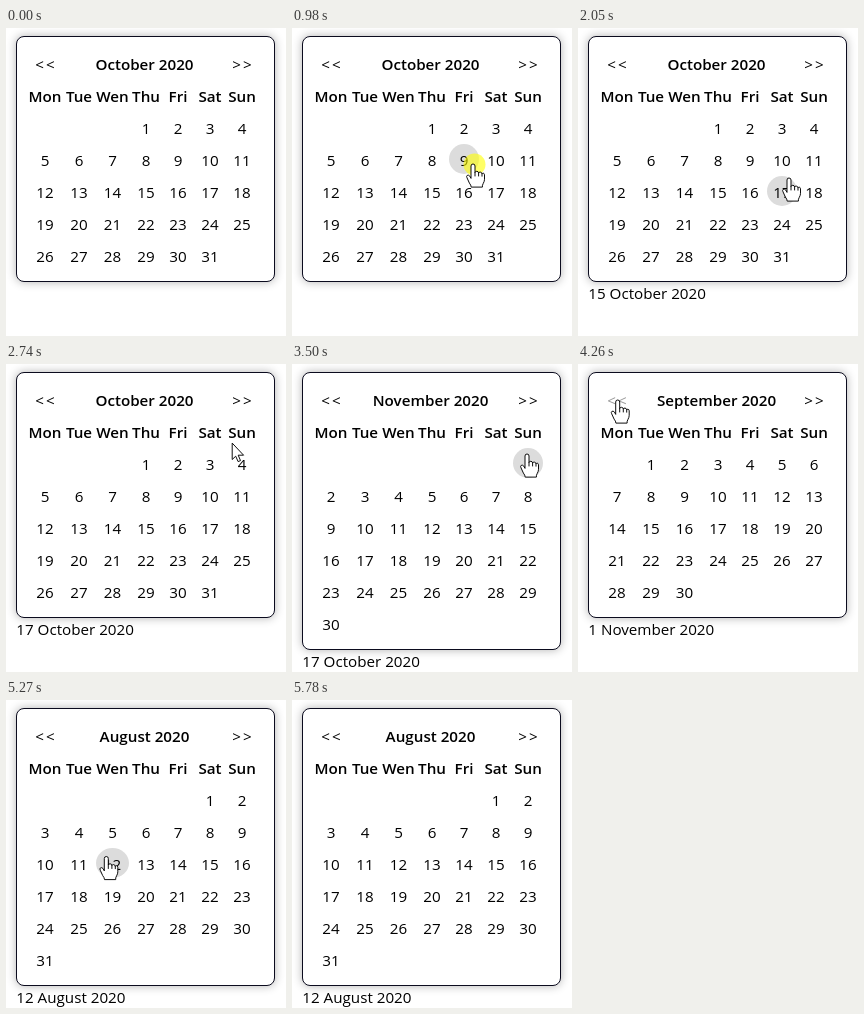
Write an HTML page that moves like this. It is 280 px wide and 308 px high and loops after 6.1 s.

```html
<!DOCTYPE html>
<html lang="en">
<head>
<meta charset="utf-8">
<title>Date picker</title>
<style>
  html, body { margin: 0; width: 100%; height: 100%; overflow: hidden; background: #fff; }
  #stage { position: relative; width: 280px; height: 308px; overflow: hidden; }
  #card {
    position: absolute; left: 10px; top: 8px; width: 259px; box-sizing: border-box;
    border: 1px solid #0b0b1e; border-radius: 8px; background: #fff;
    box-shadow: 0 0 10px rgba(0, 0, 0, .3);
  }
  svg {
    position: absolute; left: 0; top: 0;
    font: 15.2px "Open Sans", "Noto Sans", sans-serif; text-anchor: middle;
  }
  .bold { font-weight: 600; }
  .nav { letter-spacing: 2px; }
  .nav.over { fill: #999; }
  #picked { text-anchor: start; }
  .pointer { fill: #fff; stroke: #000; stroke-width: .95; stroke-linejoin: round; stroke-linecap: round; }
</style>
</head>
<body>
<div id="stage">
  <div id="card"></div>
  <svg width="280" height="308" viewBox="0 0 280 308">
    <ellipse id="hover" ry="15" fill="#dcdcdc"/>
    <text id="title" class="bold" x="138.5" y="42"></text>
    <text id="prev" class="nav" x="40" y="42">&lt;&lt;</text>
    <text id="next" class="nav" x="237" y="42">&gt;&gt;</text>
    <g id="week" class="bold"></g>
    <g id="days"></g>
    <text id="picked" x="10.3"></text>
    <g id="mouse">
      <circle id="press" cx="1.5" cy=".5" r="11" fill="#ff0" fill-opacity=".6"/>
      <path id="arrow" class="pointer" d="M.5 .5V16.5L4 13.2 6.4 18.6 8.8 17.6 6.5 12.2H11.5Z"/>
      <g id="hand" class="pointer">
        <path d="M-2 14V2a2 2 0 0 1 4 0V8.5q.3-1.2 1.8-1.2t1.8 1.6q.3-.9 1.7-.8t1.7 1.7q.3-.7 1.3-.6t1.2 1.6v4.5q0 2-1.2 4t-.9 3.8H-1.8q-.1-2-1.8-4L-6 13.8q-.9-1.6 .2-2.4t2.3 .4z"/>
        <path d="M2 8.5v3.5M5.6 8.9v3.1M9 9.8v2.4" fill="none"/>
      </g>
    </g>
  </svg>
</div>
<script>
const LOOP = 6100, YEAR = 2020, FIRST_MONTH = 9;
const ACT_DELAY = 80, PRESS_TIME = 110;
const MONTHS = { 7: 'August', 8: 'September', 9: 'October', 10: 'November' };
const WEEK = ['Mon', 'Tue', 'Wen', 'Thu', 'Fri', 'Sat', 'Sun'];
const GRID_LEFT = 22, GAP = 2;
const WIDTHS = [34, 30, 33, 30, 30, 30, 30];
const COLS = WIDTHS.map((w, i) =>
  WIDTHS.slice(0, i).reduce((x, prev) => x + prev + GAP, GRID_LEFT) + w / 2);
const $ = id => document.getElementById(id);
const show = (el, on) => { el.style.display = on ? '' : 'none'; };
const baseline = row => 42 + 32 * row;

const linear = u => u;
const easeOut = u => 1 - (1 - u) ** 2;
const smooth = u => u * u * (3 - 2 * u);

// time, x, y, easing into this point
const PATH = [
  [640, 277, 159], [680, 251, 146, linear], [840, 181, 136, easeOut],
  [1110, 181, 136], [1320, 141, 157],
  [1820, 141, 157], [2050, 211, 150], [2080, 211, 150], [2280, 208, 157],
  [2470, 208, 157], [2930, 236, 33.7],
  [3280, 236, 33.7], [3500, 235, 90],
  [3640, 235, 90], [3880, 39.7, 36],
  [4600, 39.7, 36], [5060, 100.3, 156.5],
  [5400, 100.3, 156.5], [5720, 259, 293]
];
const HIDE_AT = 5740;

// time, then a day to pick or a month step
const CLICKS = [
  [980, { day: 9 }], [1690, { day: 15 }], [2340, { day: 17 }], [2960, { step: 1 }],
  [3520, { day: 1 }], [3900, { step: -1 }], [4150, { step: -1 }],
  [4470, { step: -1 }], [5120, { day: 12 }]
];

function addText(parent, x, y, label) {
  const el = document.createElementNS('http://www.w3.org/2000/svg', 'text');
  el.setAttribute('x', x);
  el.setAttribute('y', y);
  el.textContent = label;
  parent.append(el);
}

function layout(month) {
  const offset = (new Date(YEAR, month, 1).getDay() + 6) % 7;
  const count = new Date(YEAR, month + 1, 0).getDate();
  return { offset, count, rows: Math.ceil((offset + count) / 7) };
}

let shownMonth;
function drawMonth(month) {
  if (month === shownMonth) return;
  shownMonth = month;
  const { offset, count, rows } = layout(month);
  $('title').textContent = `${MONTHS[month]} ${YEAR}`;
  $('days').replaceChildren();
  for (let day = 1; day <= count; day++) {
    const cell = offset + day - 1;
    addText($('days'), COLS[cell % 7], baseline(2 + Math.floor(cell / 7)), day);
  }
  $('card').style.height = 86 + 32 * rows + 'px';
  $('picked').setAttribute('y', 111 + 32 * rows);
}

function mouseAt(t) {
  let i = PATH.findIndex(p => p[0] > t);
  if (i < 0) i = PATH.length;
  if (i === 0 || i === PATH.length) return PATH[Math.max(0, i - 1)].slice(1, 3);
  const [t0, x0, y0] = PATH[i - 1];
  const [t1, x1, y1, ease = smooth] = PATH[i];
  const s = ease((t - t0) / (t1 - t0));
  return [x0 + (x1 - x0) * s, y0 + (y1 - y0) * s];
}

function stateAt(t) {
  let month = FIRST_MONTH, picked = '';
  for (const [at, { day, step }] of CLICKS) {
    if (t < at + ACT_DELAY) break;
    if (step) month += step;
    else picked = `${day} ${MONTHS[month]} ${YEAR}`;
  }
  return { month, picked };
}

function hitTest(x, y, month) {
  const col = COLS.findIndex((c, i) => Math.abs(c - x) <= (WIDTHS[i] + GAP) / 2);
  const row = Math.round((y - 35) / 32);
  if (col < 0) return {};
  if (row === 0) return { nav: { 0: 'prev', 6: 'next' }[col] };
  const { offset, count } = layout(month);
  const day = (row - 2) * 7 + col - offset + 1;
  return row > 1 && day >= 1 && day <= count ? { col, row } : {};
}

function render(t) {
  const { month, picked } = stateAt(t);
  drawMonth(month);
  $('picked').textContent = picked;

  const visible = t >= PATH[0][0] && t < HIDE_AT;
  const [x, y] = mouseAt(t);
  const hit = visible ? hitTest(x, y, month) : {};
  const overDay = hit.row !== undefined;
  show($('hover'), overDay);
  if (overDay) {
    $('hover').setAttribute('cx', COLS[hit.col]);
    $('hover').setAttribute('cy', baseline(hit.row) - 7);
    $('hover').setAttribute('rx', WIDTHS[hit.col] / 2);
  }
  for (const id of ['prev', 'next']) $(id).classList.toggle('over', hit.nav === id);

  const hand = overDay || !!hit.nav;
  show($('mouse'), visible);
  show($('hand'), hand);
  show($('arrow'), !hand);
  show($('press'), CLICKS.some(([at]) => t >= at && t < at + PRESS_TIME));
  $('mouse').setAttribute('transform', `translate(${x.toFixed(1)} ${y.toFixed(1)})`);
}

WEEK.forEach((name, i) => addText($('week'), COLS[i], baseline(1), name));

function tick() {
  render(performance.now() % LOOP);
  requestAnimationFrame(tick);
}
tick();
</script>
</body>
</html>
```
